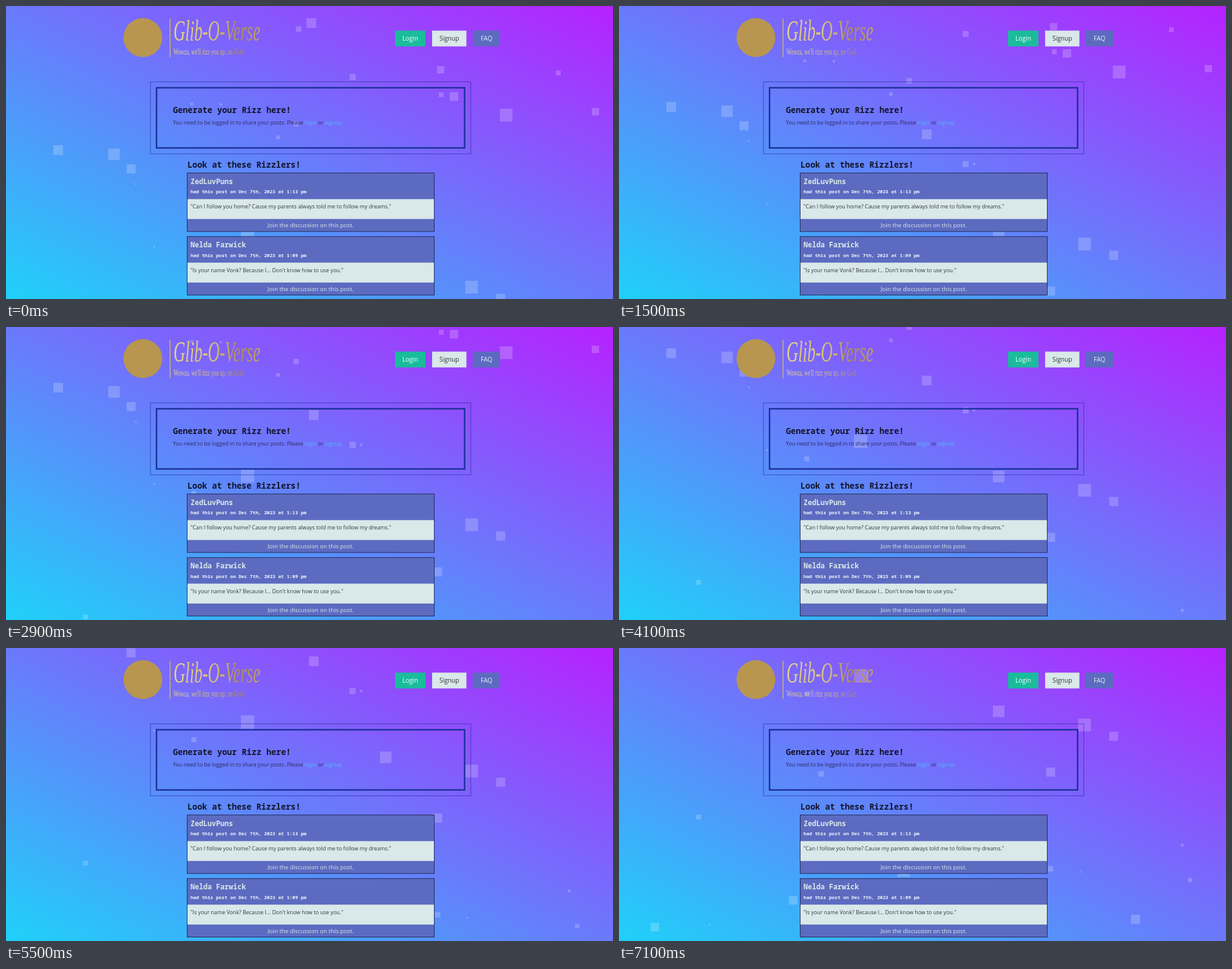
An HTML page that plays this animation: 1000x482 px, repeating every 7200 ms.

```html
<!DOCTYPE html>
<html lang="en">
<head>
<meta charset="utf-8">
<title>Drifting squares</title>
<style>
  html, body { margin: 0; width: 100%; height: 100%; overflow: hidden; }
  body { background: linear-gradient(to top right, #1fd1f9, #b621fe); }
  svg { display: block; width: 100%; height: 100%; }
  text { font: 8.84px "Open Sans", "Noto Sans", sans-serif; fill: #2c2a5e; }
  .head, .name, .date { font-family: "Noto Sans Mono", "DejaVu Sans Mono", monospace; font-weight: 700; }
  .head { font-size: 13.5px; fill: #14142a; }
  .name { font-size: 11.7px; fill: #d9e8e8; }
  .date { font-size: 7.77px; fill: #f2f6fa; }
  .quote { fill: #333a40; }
  .join { font-size: 9.7px; fill: #d9e8e8; text-anchor: middle; }
  .button { font-size: 10.2px; fill: #fff; text-anchor: middle; }
  .link { fill: #55b8fa; }
  .logo text { font-family: "Liberation Serif", serif; fill: url(#gold); }
  .logo .title { font-size: 26.8px; font-style: italic; }
  .logo .tagline { font-size: 8.4px; }
</style>
</head>
<body>
<svg viewBox="0 0 1000 482" preserveAspectRatio="none">
  <defs>
    <linearGradient id="gold" gradientUnits="userSpaceOnUse" x1="276" y1="0" x2="422" y2="0">
      <stop offset="0" stop-color="#e6d28a"/>
      <stop offset=".45" stop-color="#d8c07a"/>
      <stop offset=".75" stop-color="#a98a58"/>
      <stop offset="1" stop-color="#c4a865"/>
    </linearGradient>
  </defs>

  <g id="squares" fill="#fff" fill-opacity=".2"></g>

  <g class="logo">
    <circle cx="225.5" cy="52" r="32" fill="#b8964f"/>
    <rect x="269.5" y="21" width="1.6" height="63" fill="#c8b070"/>
    <g transform="scale(1 1.8)">
      <text class="title" x="276" y="31.4">Glib-O-Verse</text>
      <text class="tagline" x="276" y="44.4">Wowza, we'll rizz you up, on God.</text>
    </g>
  </g>

  <rect x="641" y="40.5" width="50" height="26" fill="#1abc9c"/>
  <rect x="702" y="40.5" width="56.5" height="26" fill="#d9e8e8"/>
  <rect x="769" y="40.5" width="45" height="26" fill="#5c6bc0"/>
  <text class="button" x="666" y="57.4">Login</text>
  <text class="button" x="730.3" y="57.4" style="fill:#333">Signup</text>
  <text class="button" x="791.5" y="57.4" style="fill:#e6eef2">FAQ</text>

  <rect x="238" y="124.8" width="527.7" height="118.4" fill="none" stroke="#1a2080" stroke-opacity=".6" stroke-width=".9"/>
  <rect x="248" y="134.5" width="507.5" height="99" fill="none" stroke="#1a2f98" stroke-width="2.4"/>
  <text class="head" x="275" y="175.5">Generate your Rizz here!</text>
  <text x="275" y="194.6">You need to be logged in to share your posts. Please <tspan class="link">login</tspan> or <tspan class="link">signup.</tspan></text>

  <text class="head" x="299" y="266">Look at these Rizzlers!</text>
  <g id="cards"></g>
</svg>
<script>
  const LOOP = 7200, STEP = 100, SPEED = 0.0473; // ms, ms, px per ms

  const squares = document.getElementById("squares");
  const cards = document.getElementById("cards");

  // centre x, centre y at the loop start, side
  const specks = [
    [503, 28, 16], [482, 38, 9], [571, 117, 10], [716, 105, 12], [910, 110, 8],
    [717, 146, 8], [738, 149, 14], [824, 179.5, 21], [971, 174, 12], [478, 194, 9],
    [448, 216, 6], [86, 237, 16], [178, 244, 19], [206, 268, 15], [214, 293, 3],
    [398, 382, 22], [767, 462.5, 21], [815, 481, 15], [507, 282, 16], [571, 331, 10],
    [585, 331, 4], [309.5, 411, 8], [625.5, 440, 19], [711, 540, 15], [333, 543, 9],
    [131, 614, 8], [928, 660, 5], [941, 717.5, 7], [711, 699, 9], [760, 704, 3],
    [244, 396, 3], [306, 161, 5], [354, 162, 4], [287, 751, 14], [59, 795, 14],
    [149, 791, 3], [851, 782, 15], [469, 702, 21]
  ];
  squares.innerHTML = specks.map(([x, y, s]) =>
    `<rect x="${x - s / 2}" y="${y - s / 2}" width="${s}" height="${s}"/>`).join("");

  const card = (y, name, time, quote) => `
    <g transform="translate(298.5 ${y})">
      <rect width="407" height="96.3" fill="#5c6bc0"/>
      <rect y="43" width="407" height="32.7" fill="#d9e8e8"/>
      <rect width="407" height="96.3" fill="none" stroke="#1c2050" stroke-width=".9"/>
      <text class="name" x="5.5" y="18.2">${name}</text>
      <text class="date" x="5.5" y="33.6">had this post on Dec 7th, 2023 at ${time} pm</text>
      <text class="quote" x="5.5" y="58.4">"${quote}"</text>
      <text class="join" x="203.5" y="89.8">Join the discussion on this post.</text>
    </g>`;
  cards.innerHTML =
    card(274.7, "ZedLuvPuns", "1:13", "Can I follow you home? Cause my parents always told me to follow my dreams.") +
    card(379.2, "Nelda Farwick", "1:09", "Is your name Vonk? Because I... Don't know how to use you.");

  const start = performance.now();
  function draw() {
    const t = (performance.now() - start) % LOOP;
    const shown = Math.floor(t / STEP) * STEP;
    squares.setAttribute("transform", `translate(0 ${-SPEED * shown})`);
    requestAnimationFrame(draw);
  }
  draw();
</script>
</body>
</html>
```
